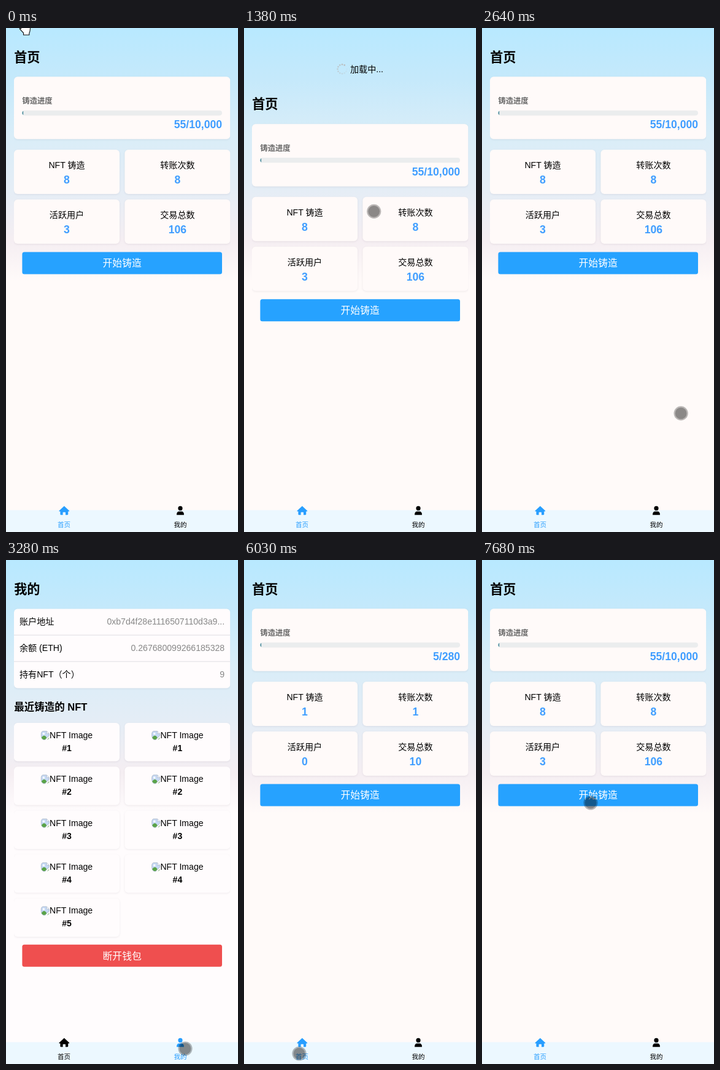
An HTML page that plays this animation: 378x820 px, repeating every 8 s.

```html
<!DOCTYPE html>
<html lang="zh-CN">
<head>
<meta charset="utf-8">
<title>铸造</title>
<style>
  html, body { margin: 0; width: 100%; height: 100%; overflow: hidden; background: #fffaf9; }
  svg { display: block; width: 100vw; height: 100vh; }
  text { font: 14.08px 'Liberation Sans', 'Noto Sans CJK SC', 'Noto Sans CJK', 'Noto Sans CJK JP', sans-serif; }
  .mid { text-anchor: middle; }
  .end { text-anchor: end; }
  .bold { font-weight: 700; }
  .title { font-size: 21.12px; font-weight: 700; }
  .section { font-size: 16.5px; font-weight: 700; }
  .caption { font-size: 12.32px; font-weight: 700; fill: #666; }
  .num { font-size: 17.6px; font-weight: 700; fill: #409eff; }
  .btn { font-size: 15.84px; font-weight: 500; fill: #fff; }
  .val { fill: #888; }
  .tab text { font-size: 10.56px; }
  .card { filter: drop-shadow(0 1px 1.5px rgba(40, 30, 50, .08)); }
</style>
</head>
<body>
<svg id="stage" viewBox="0 0 378 820" preserveAspectRatio="none"></svg>
<script>
const LOOP = 8000;
const BLUE = '#289eff';
const stage = document.getElementById('stage');

const text = (x, y, s, cls = '', id = '') =>
  `<text x="${x}" y="${y}" class="${cls}"${id && ` id="${id}"`}>${s}</text>`;
const box = (x, y, w, h, r, fill, cls = '') =>
  `<rect x="${x}" y="${y}" width="${w}" height="${h}" rx="${r}" fill="${fill}" class="${cls}"/>`;
const button = (y, fill, label) =>
  box(26.4, y, 325.6, 36, 3.5, fill) + text(189.2, y + 24, label, 'btn mid');

// Home view
const stat = (x, y, label, id) =>
  box(x, y, 172, 72, 6, '#fffaf9', 'card') +
  text(x + 86, y + 30, label, 'mid') +
  text(x + 86, y + 55, '', 'num mid', id);

const home = `
  ${text(13.2, 54.5, '首页', 'title')}
  ${box(13, 79.3, 352.3, 101.5, 6, '#fffaf9', 'card')}
  ${text(26.4, 122.8, '铸造进度', 'caption')}
  ${box(26.4, 134.2, 325.6, 8.2, 4.1, '#ebedee')}
  <path d="M28.2 134.8q-1.8 1.2-1.8 3.5t1.8 3.5z" fill="#4a8c9c"/>
  ${text(352, 163, '', 'num end', 'progress')}
  ${stat(13, 198, 'NFT 铸造', 'minted')}
  ${stat(193.4, 198, '转账次数', 'moves')}
  ${stat(13, 279, '活跃用户', 'users')}
  ${stat(193.4, 279, '交易总数', 'trades')}
  ${button(364.4, '#26a2ff', '开始铸造')}`;

// Profile view
const row = (i, label, value) =>
  text(22, 105 + i * 43, label) + text(356.2, 105 + i * 43, value, 'val end');

const brokenIcon = (x, y) => `<g transform="translate(${x} ${y})">
  <path d="M3 .5H9.5L13.5 4.5V8L9 12L7 14.5H4Q.5 13 .5 8V4Q1 1 3 .5Z" fill="#c6d9f4" stroke="#a9b4c4" stroke-width=".8"/>
  <path d="M1 11Q4 6 7.5 8.5L9.5 11L7 14H4Q2 13 1 11Z" fill="#5aa348"/>
  <circle cx="4.6" cy="4.6" r="1.7" fill="#fff"/>
  <path d="M9.5 .8V4.5H13.2" fill="#fff" stroke="#a9b4c4" stroke-width=".7"/>
  <path d="M10 14.5L13.5 10.5V12Q12.5 14 10 14.5Z" fill="#8fbb88"/></g>`;

const nft = n => {
  const x = n % 2 ? 193.4 : 13, r = n >> 1, y = 265 + r * 71.35;
  return box(x, y, 172, 62.5, 6, '#fffcfd', 'card') +
    brokenIcon(x + 43.8, y + 13) +
    text(x + 58, y + 25, 'NFT Image') +
    text(x + 86, y + 46, '#' + (r + 1), 'bold mid');
};

const mine = `
  ${text(13.2, 54.5, '我的', 'title')}
  ${box(13, 79.5, 352.3, 129, 6, '#fffcfd', 'card')}
  <path d="M13 122.3H365.3M13 165.2H365.3" stroke="#e9e8ec" stroke-width="1.6"/>
  ${row(0, '账户地址', '0xb7d4f28e1116507110d3a9...')}
  ${row(1, '余额 (ETH)', '0.267680099266185328')}
  ${row(2, '持有NFT（个）', '9')}
  ${text(13.2, 245, '最近铸造的 NFT', 'section')}
  ${Array.from({ length: 9 }, (_, n) => nft(n)).join('')}
  ${button(625.8, '#ef4f4f', '断开钱包')}`;

const dots = Array.from({ length: 12 }, (_, i) =>
  `<circle class="dot" cy="-7.5" r="1.4" fill="#bbb" transform="rotate(${i * 30})"/>`).join('');

stage.innerHTML = `
  <defs>
    <linearGradient id="sky" x1="0" y1="0" x2="0" y2="1">
      <stop offset="0" stop-color="#b8e9ff"/>
      <stop offset=".2" stop-color="#c5e9fb"/>
      <stop offset=".42" stop-color="#d9edf8"/>
      <stop offset=".63" stop-color="#e4edf6"/>
      <stop offset=".84" stop-color="#f5eef2"/>
      <stop id="base" offset="1"/>
    </linearGradient>
    <clipPath id="frame"><rect x="13" y="12.5" width="352.5" height="808"/></clipPath>
  </defs>
  <rect id="paper" width="378" height="820"/>
  <rect width="378" height="412" fill="url(#sky)"/>
  <g clip-path="url(#frame)">
    <g id="home">
      <g id="spinner" transform="translate(160 -10)">${dots}</g>
      ${text(189, -5, '', 'mid', 'hint')}
      ${home}
    </g>
    <g id="mine">${mine}</g>
  </g>
  <rect y="784.5" width="378" height="36" fill="#ecf8ff"/>
  <g id="tabHome" class="tab">
    <path d="M94.8 777.8L103.2 785.4Q103.4 786.4 102.4 786.4H101.2V791Q101.2 792.2 100 792.2H97V788.6Q97 787.8 96.2 787.8H93.4Q92.6 787.8 92.6 788.6V792.2H89.6Q88.4 792.2 88.4 791V786.4H87.2Q86.2 786.4 86.4 785.4Z"/>
    ${text(94.6, 811.7, '首页', 'mid')}
  </g>
  <g id="tabMine" class="tab">
    <circle cx="284" cy="781.4" r="3.6"/>
    <path d="M278 792.2Q277.8 786.4 282.4 786.4H285.6Q290.2 786.4 290 792.2Z"/>
    ${text(284, 811.7, '我的', 'mid')}
  </g>
  <path id="hand" d="M25-6L24.5 1Q22-1 22.3 1.5L28.5 8V11.2H37.8V8.5Q39.8 5 39.6-6Z" fill="#fff" stroke="#111" stroke-width="1.1"/>
  <g id="touch">
    <circle r="11.6" fill="#000" fill-opacity=".27"/>
    <circle r="9.4" fill="#000" fill-opacity=".25"/>
  </g>`;

const el = id => document.getElementById(id);
const show = (id, on) => el(id).setAttribute('display', on ? 'inline' : 'none');
const clamp = v => Math.min(1, Math.max(0, v));

// Pointer: time, x, y
const PATH = [
  [90, 40, 14], [830, 170, 110], [1030, 175, 250], [1350, 205, 290],
  [2010, 348, 468], [2280, 338, 560], [2550, 335, 570], [2910, 292, 795],
  [3370, 292, 795], [3930, 236, 772], [4200, 236, 772], [4750, 90, 803],
  [6450, 90, 803], [7680, 177, 395], [8000, 177, 395]
];

function pointer(t) {
  const i = Math.max(1, PATH.findIndex(p => p[0] > t));
  const [t0, x0, y0] = PATH[i - 1], [t1, x1, y1] = PATH[i];
  const k = clamp((t - t0) / (t1 - t0));
  return [x0 + (x1 - x0) * k, y0 + (y1 - y0) * k];
}

// Pull to refresh: drag at half speed, settle at the loading height, spring back
const GRAB = 830, DROP = 1350, LOADED = 1900, REST = 44;
const left = (t, t0) => (1 - clamp((t - t0) / 200)) ** 2;

function pull(t) {
  if (t < GRAB) return 0;
  if (t < DROP) return (pointer(t)[1] - 110) / 2;
  if (t < LOADED) return REST + (90 - REST) * left(t, DROP);
  return REST * left(t, LOADED);
}

const count = (t, from, to) => Math.round(to * (1 - (1 - clamp((t - from) / 1500)) ** 5));

function render(t) {
  const onMine = t >= 3280 && t < 6030;
  const base = onMine ? '#fffcfd' : '#fffaf9';
  show('home', !onMine);
  show('mine', onMine);
  el('paper').setAttribute('fill', base);
  el('base').setAttribute('stop-color', base);
  el('tabHome').setAttribute('fill', onMine ? '#000' : BLUE);
  el('tabMine').setAttribute('fill', onMine ? BLUE : '#000');

  const dy = pull(t), loading = t >= DROP && t < LOADED;
  el('home').setAttribute('transform', `translate(0 ${dy})`);
  el('hint').textContent = loading ? '加载中...' : t < DROP && dy >= 61 ? '释放更新' : '下拉刷新';
  el('hint').setAttribute('x', loading ? 200 : 189);
  show('spinner', loading);
  stage.querySelectorAll('.dot').forEach((d, i) =>
    d.setAttribute('opacity', 1 - (t / 1200 - i / 12 + 1) % 1));

  // Counters run again after coming back, ticking every 90 ms
  const c = t < 6030 ? LOOP : 6030 + Math.max(0, Math.floor((t - 6050) / 90)) * 90;
  const value = to => count(c, 6000, to);
  el('progress').textContent = value(55) + '/' + count(c, 6021.5, 10000).toLocaleString('en-US');
  el('minted').textContent = el('moves').textContent = value(8);
  el('users').textContent = value(3);
  el('trades').textContent = value(106);

  show('hand', t < 90);
  show('touch', t >= 90);
  el('touch').setAttribute('transform', `translate(${pointer(t)})`);
}

const start = performance.now();
function tick() {
  render((performance.now() - start) % LOOP);
  requestAnimationFrame(tick);
}
tick();
</script>
</body>
</html>
```
